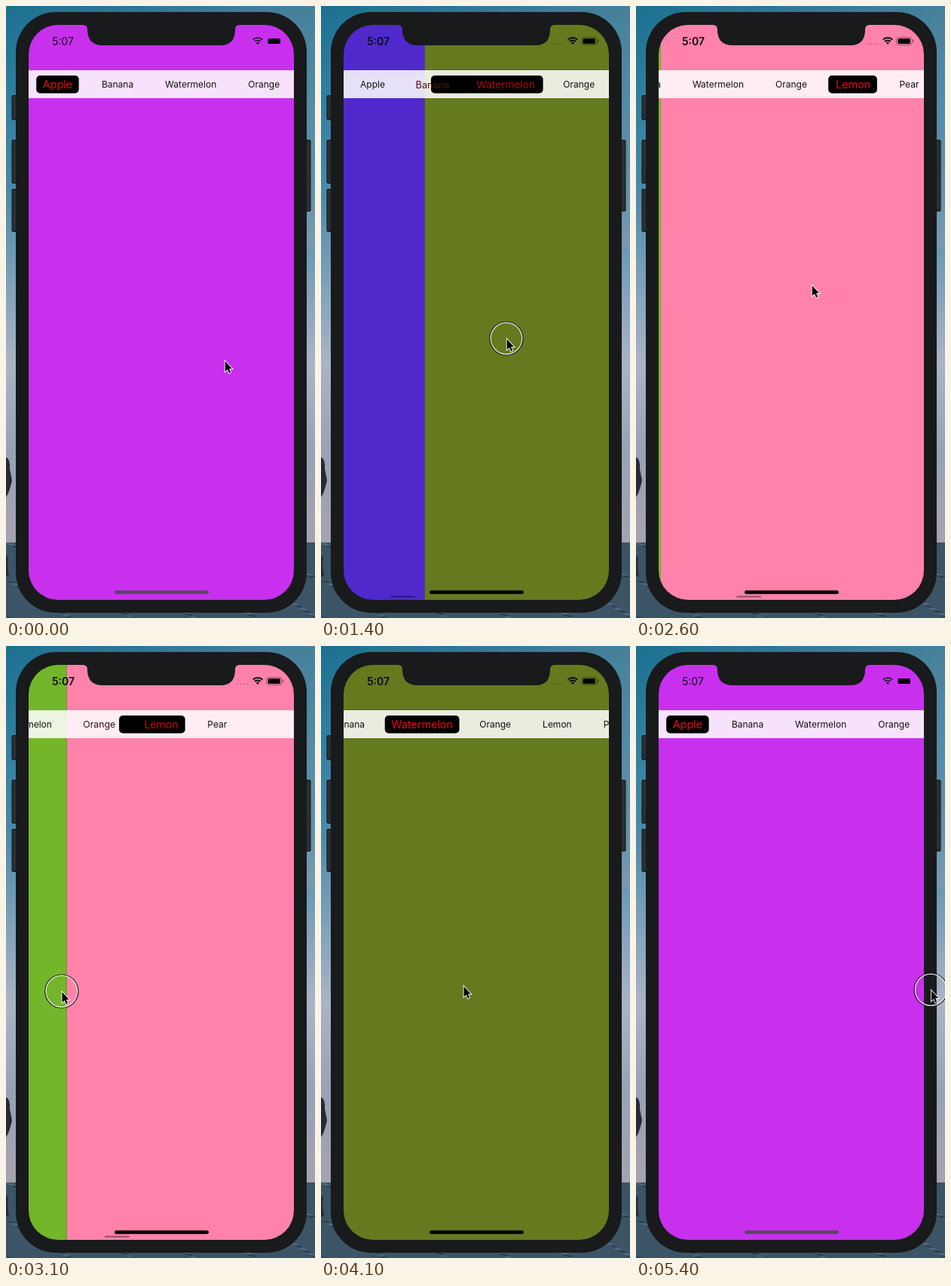
These frames come from a looping animation (410 by 810 pixels, 5.5 s). An HTML page with a canvas:

```html
<!DOCTYPE html>
<html lang="en">
<head>
<meta charset="utf-8">
<title>Fruit tabs</title>
<style>
  html, body { margin: 0; width: 100%; height: 100%; overflow: hidden; }
  canvas { display: block; width: 410px; height: 810px; }
</style>
</head>
<body>
<canvas width="410" height="810"></canvas>
<script>
const ctx = document.querySelector('canvas').getContext('2d');
const LOOP = 5500, STEP = 100;
const LEFT = 30, TOP = 25, WIDTH = 352, HEIGHT = 761, CENTER = LEFT + WIDTH / 2;
const FONT = 12, ZOOM = 1.2, GAP = 42, PADDING = 8.5;
const BODY = '#181a1b', INK = '#0b080d';

const mix = (a, b, k) => a + (b - a) * k;
const clamp = v => Math.max(0, Math.min(1, v));
const ease = u => (u = clamp(u), u * u * (3 - 2 * u));
const setFont = (size, weight = 400) => ctx.font = `${weight} ${size}px Inter, sans-serif`;

const colors = { Apple: '#c830ee', Banana: '#5029cc', Watermelon: '#657a1f', Orange: '#74b62a', Lemon: '#ff82ab', Pear: '#ff82ab' };
setFont(FONT);
let edge = LEFT + 22;
const tabs = Object.entries(colors).map(([name, color]) => {
  const w = ctx.measureText(name).width, x = edge + w / 2;
  edge += w + GAP;
  return { name, color, x, half: w * ZOOM / 2 + PADDING };
});

// The first swipe is held slightly past its page.
const swipes = [
  { to: 1.015, start: 390, end: 1000, x: 0, y: 472 },
  { to: 2, start: 1230, end: 1500, x: 240, y: 440 },
  { to: 3, start: 1550, end: 1929, x: 195, y: 417 },
  { to: 4, start: 2250, end: 2620, x: 233, y: 369 },
  { to: 3, start: 3000, end: 3418, x: 397, y: 457 },
  { to: 2, start: 3720, end: 4000, x: 200, y: 450 },
  { to: 1, start: 4200, end: 4613, x: 193, y: 443 },
  { to: 0, start: 4850, end: 5250, x: 425, y: 455 }
];
swipes.forEach((s, i) => {
  const forward = s.to > (i ? swipes[i - 1].to : 0);
  s.fromX = forward ? 350 : 50;
  s.hold = Math.abs(s.x - s.fromX) * 1.8;
});

const pageAt = t => swipes.reduce((page, s) => mix(page, s.to, ease((t - s.start) / (s.end - s.start))), 0);

// The tab strip centres the chosen tab once its page has settled.
const scrollAt = t => swipes.reduce((scroll, s) =>
  mix(scroll, Math.max(0, tabs[Math.round(s.to)].x - CENTER), ease((t - s.end) / 300)), 0);

function cursorAt(t) {
  let x = 290, y = 469;
  for (const s of swipes) {
    const approach = ease((t - s.start) / 120 + 1);
    x = mix(mix(x, s.fromX, approach), s.x, ease((t - s.start) / s.hold));
    y = mix(y, s.y, approach);
  }
  return { x, y, pressed: swipes.some(s => t >= s.start && t < s.start + s.hold) };
}

function rect(x, y, w, h, color, r = 0) {
  ctx.fillStyle = color;
  ctx.beginPath();
  ctx.roundRect(x, y, w, h, r);
  ctx.fill();
}

function shape(d, color) {
  ctx.fillStyle = color;
  ctx.fill(new Path2D(d));
}

function arc(x, y, r, from, to, color, width) {
  ctx.strokeStyle = color;
  ctx.lineWidth = width;
  ctx.beginPath();
  ctx.arc(x, y, r, from, to);
  ctx.stroke();
}

function gradient(x, y, ...stops) {
  const g = ctx.createLinearGradient(0, 0, x, y);
  stops.forEach((color, i) => g.addColorStop(i / (stops.length - 1), color));
  return g;
}
const sky = gradient(0, 710, '#1c7090', '#2f7fa0', '#4788a9', '#7a9fb8', '#a9b4c5', '#98a2b5', '#a5a3b1');
const haze = gradient(410, 0, 'rgba(150,160,175,0)', 'rgba(150,160,175,.35)');

function drawBackdrop() {
  rect(0, 0, 410, 710, sky);
  rect(0, 0, 410, 320, haze);
  rect(0, 710, 410, 100, '#3c5566');
  for (let i = 0; i < 400; i++) {
    const shade = i % 2 ? 'rgba(20,40,55,.5)' : 'rgba(125,145,160,.35)';
    rect(i * 61.8 % 410, 711 + i * 37.3 % 99, 6, 1.2, shade);
  }
  shape('M0 597Q6 600 5 612L8 628 6 636 3 645 0 650ZM0 727L3 730 2 742 4 755H0Z', '#262a35');
}

function drawPhone() {
  for (const [x, y, h] of [[7.5, 118, 33], [7.5, 177, 58], [7.5, 242, 57], [397, 177, 95]]) {
    rect(x, y, 7.5, h, '#111314', 2);
    rect(x + 1, y + 1, 5.5, h - 2, '#2b2f31', 1);
  }
  rect(13, 8, 386, 795, BODY, 53);
}

function drawPages(page) {
  tabs.forEach((tab, i) => rect(LEFT + (i - page) * WIDTH, TOP, WIDTH, HEIGHT, tab.color));
}

function drawTabs(page, scroll) {
  rect(LEFT, 85, WIDTH, 37, 'rgba(255,255,255,.86)');
  ctx.save();
  ctx.translate(-scroll, 0);

  // The leading edge travels in the first half, the trailing edge in the second.
  const i = Math.floor(page), k = page - i;
  const a = tabs[i], b = tabs[i + 1];
  const left = mix(a.x - a.half, b.x - b.half, clamp(2 * k - 1));
  const right = mix(a.x + a.half, b.x + b.half, clamp(2 * k));
  rect(left, 92, right - left, 23.5, '#000', 5);

  ctx.textAlign = 'center';
  tabs.forEach((tab, n) => {
    const on = clamp(1 - Math.abs(n - page));
    const size = FONT * mix(1, ZOOM, on);
    setFont(size);
    ctx.fillStyle = `rgb(${mix(18, 245, on)},${18 * (1 - on)},18)`;
    ctx.fillText(tab.name, tab.x, 104 + size * .36);
  });
  ctx.restore();
}

function drawStatus(page) {
  const thin = page < .5;
  ctx.textAlign = 'left';
  setFont(14, thin ? 400 : 600);
  ctx.fillStyle = INK;
  ctx.fillText('5:07', 61, 51.5);

  for (const r of [9, 5.6]) arc(334, 51, r, -Math.PI * .75, -Math.PI * .25, INK, thin ? 1.4 : 2);
  shape('M334 51L331.8 48.6Q334 47 336.2 48.6Z', INK);
  rect(347.5, 43, 16.5, 7, '#000', 1.5);
  if (thin) return;
  for (let n = 0; n < 4; n++) rect(306 + n * 4.4, 49, 2.2, 2.2, 'rgba(0,0,0,.22)', 1.1);
  ctx.strokeStyle = 'rgba(0,0,0,.4)';
  ctx.lineWidth = 1;
  ctx.beginPath();
  ctx.roundRect(345.5, 41.5, 20.5, 10, 3);
  ctx.stroke();
  rect(367, 44.5, 1.3, 4, 'rgba(0,0,0,.4)', .6);
}

function drawCursor({ x, y, pressed }) {
  if (pressed) {
    arc(x, y, 22, 0, 7, '#111', 1.2);
    arc(x, y, 20.8, 0, 7, '#e8e8e8', 1.2);
  }
  const arrow = new Path2D('M.8 1V16L4.5 13 7 18.4 9.4 17.3 7 12H11.5Z');
  ctx.save();
  ctx.translate(x, y);
  ctx.scale(.87, .92);
  ctx.strokeStyle = '#fff';
  ctx.lineWidth = 2;
  ctx.stroke(arrow);
  ctx.fillStyle = '#000';
  ctx.fill(arrow);
  ctx.restore();
}

function draw(t) {
  const page = pageAt(t);
  drawBackdrop();
  drawPhone();
  ctx.save();
  ctx.beginPath();
  ctx.roundRect(LEFT, TOP, WIDTH, HEIGHT, 39);
  ctx.clip();
  drawPages(page);
  drawTabs(page, scrollAt(t));
  drawStatus(page);
  if (page !== pageAt(t - STEP)) rect(61.5 + 18 * page, 780.5, 33, 2.5, 'rgba(0,0,0,.35)', 1.2);
  rect(144, 773.5, 125, 4.8, page < 1.5 ? '#58485f' : '#000', 2.4);
  ctx.restore();
  shape('M102 24V25Q108 25 108 31V33Q109 52 128 52H285Q303 52 304 33V31Q304 25 310 25V24Z', BODY);
  drawCursor(cursorAt(t));
}

function tick(now) {
  draw(Math.floor(now % LOOP / STEP) * STEP);
  requestAnimationFrame(tick);
}
requestAnimationFrame(tick);
</script>
</body>
</html>
```
